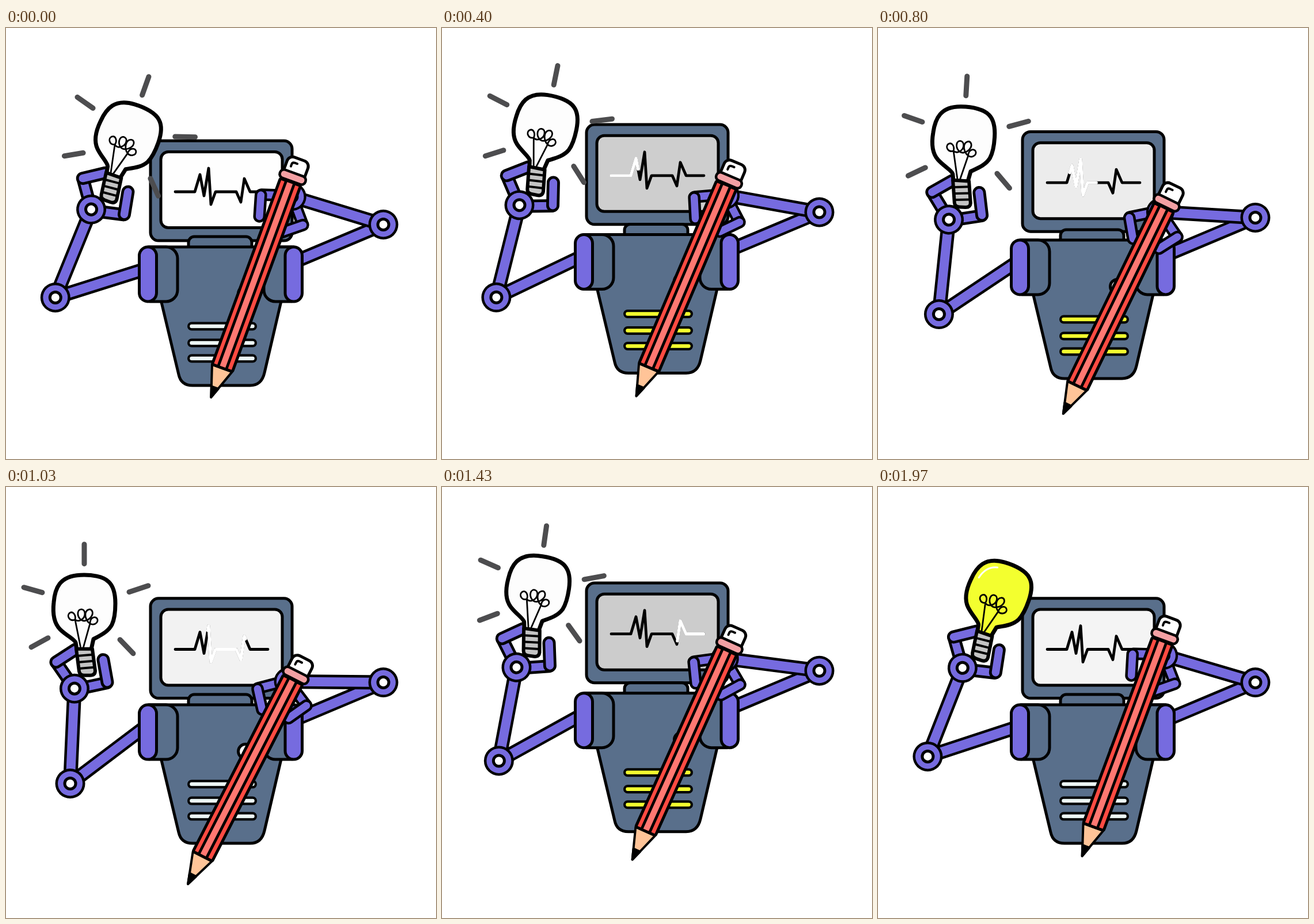
Recreate the animation shown at these times as an HTML page with a canvas. Size 747 by 750 pixels, loop 2.01 s.

```html
<!DOCTYPE html>
<html lang="en">
<head>
<meta charset="utf-8">
<title>Robot with pencil and light bulb</title>
<style>
html, body { margin: 0; width: 100%; height: 100%; overflow: hidden; background: #fff; }
canvas { display: block; }
</style>
</head>
<body>
<canvas id="stage" width="747" height="750"></canvas>
<script>
const ctx = document.getElementById('stage').getContext('2d');
const LOOP = 2010, STEPS = 60;
const BLUE = '#596f8b', PURPLE = '#766bdf', YELLOW = '#f3ff2f', INK = '#000';
const RAD = Math.PI / 180;
const clamp = v => Math.min(1, Math.max(0, v));
const smooth = u => u * u * (3 - 2 * u);

const glass = new Path2D('M4-68 L2-80 C0-86-14-92-25-103 C-36-114-38-132-36-150 ' +
  'C-34-174-26-196 10-197.5 C30-198.5 50-195 59-186 C69-177 71-160 71-148 ' +
  'C71-135 70-122 65-111 C58-98 44-92 33-86 L29-68 Z');
const filament = new Path2D('M11-70 L1-120 C-8-116-14-126-9-131 C-3-136 3-128 1-120 ' +
  'C8-114 18-122 18-130 C18-140 7-140 6-132 C5-124 12-116 19-118 ' +
  'C27-120 33-128 31-134 C28-141 20-137 19-130 C18-124 22-116 27-113 ' +
  'C33-109 41-114 40-120 C38-127 27-125 27-113 L15-70');
const socket = new Path2D('M3-69 L31-69 L36-31 Q36-23 27-23 L17-23 Q9-23 8-30 Z');
const shine = new Path2D('M-24-158 Q-18-181 1-185');
const torso = new Path2D('M247 381 H500 L449 600 Q444 622 424 622 H324 Q304 622 300 603 Z');
const pulse = new Path2D('M294 285 H328 L337 255 L344 292 L352 244 L356 307 L364 285 ' +
  'H400 L408 303 L414 262 L424 285 H455');
const PULSE_LEN = 391;
const rays = [[17, -251, 17, -217], [-88, -176, -56, -167], [-75, -72, -46, -88],
  [95, -168, 128, -179], [79, -85, 102, -61]];
const greys = [[0, 254], [1, 242], [7, 213], [17, 198], [20, 230], [29, 244], [30, 254]];

function lerpKeys(keys, x) {
  const i = keys.findIndex(k => k[0] > x);
  const [x0, y0] = keys[i - 1], [x1, y1] = keys[i];
  return y0 + (y1 - y0) * (x - x0) / (x1 - x0);
}

function paint(path, fill, width = 5, color = INK) {
  if (fill) { ctx.fillStyle = fill; ctx.fill(path); }
  if (width) { ctx.lineWidth = width; ctx.strokeStyle = color; ctx.stroke(path); }
}

function box(x0, y0, x1, y1, r, fill, width) {
  const p = new Path2D();
  p.roundRect(x0, y0, x1 - x0, y1 - y0, r);
  paint(p, fill, width);
}

function poly(points, fill, width) {
  const p = new Path2D();
  points.forEach(([x, y]) => p.lineTo(x, y));
  p.closePath();
  paint(p, fill, width);
}

function line(x0, y0, x1, y1, width, color) {
  ctx.lineWidth = width;
  ctx.strokeStyle = color;
  ctx.beginPath();
  ctx.moveTo(x0, y0);
  ctx.lineTo(x1, y1);
  ctx.stroke();
}

function rod(x0, y0, x1, y1, outer, inner, color = PURPLE) {
  line(x0, y0, x1, y1, outer, INK);
  line(x0, y0, x1, y1, inner, color);
}

function disc(x, y, r, color) {
  ctx.fillStyle = color;
  ctx.beginPath();
  ctx.arc(x, y, r, 0, 7);
  ctx.fill();
}

function joint(x, y) {
  disc(x, y, 26, INK);
  disc(x, y, 21.5, PURPLE);
  disc(x, y, 12, INK);
  disc(x, y, 7, '#fff');
}

function group(x, y, deg, draw, size = 1) {
  ctx.save();
  ctx.translate(x, y);
  ctx.rotate(deg * RAD);
  ctx.scale(size, size);
  draw();
  ctx.restore();
}

function hand() {
  rod(0, 0, -31, -45, 23, 13.5);
  rod(-32, -46, 2, -68, 23, 13.5);
  rod(0, 2, 56, -10, 23, 13.5);
  rod(50, -50, 57, -11, 23, 13.5);
  joint(0, 0);
}

function bulb(lit) {
  if (!lit) rays.forEach(r => line(...r, 9, '#4d4d4f'));
  paint(glass, lit ? YELLOW : '#fdfdfd', 7);
  paint(filament, null, 2.8);
  if (lit) paint(shine, null, 3, '#fff');
  paint(socket, '#c4c4c4', 6);
  for (let i = 0; i < 3; i++) line(7 + i * 1.5, -57 + i * 11, 31 + i * 1.5, -59 + i * 11, 4, INK);
}

function pencil() {
  poly([[0, -1], [-18, -55], [19, -55]], '#ffc498', 4);
  poly([[0, -1], [-6, -19], [6.5, -19]], INK, 4);
  box(-18, -400, 19.5, -55.5, 2, '#ff4b42', 5);
  ctx.fillStyle = '#ff7872';
  ctx.fillRect(-7, -398, 15, 340);
  line(-7, -398, -7, -57, 4.8, INK);
  line(8, -398, 8, -57, 4.8, INK);
  box(-17.5, -443, 21, -412, [10, 10, 2, 2], '#fff', 5);
  box(-22, -417, 25, -402, 7, '#f3a0a3', 4.5);
  paint(new Path2D('M-8-426 V-430 Q-8-434-3-434 H1'), null, 4);
}

function head(frame, lift) {
  const g = Math.round(lerpKeys(greys, frame % 30));
  group(0, -lift, 0, () => {
    box(251, 196.3, 497, 370, 14, BLUE);
    box(269, 215.5, 480, 347.5, 13, `rgb(${g},${g},${g})`);
    paint(pulse, null, 4.8);
    const end = PULSE_LEN * smooth(clamp(frame / 40));
    const start = PULSE_LEN * clamp((frame - 20) / 30);
    if (end - start > 1) {
      ctx.setLineDash([end - start, 1000]);
      ctx.lineDashOffset = -start;
      paint(pulse, null, 5.2, '#fff');
      ctx.setLineDash([]);
    }
  });
}

function body(frame) {
  const p = frame % 30;
  const glow = p >= 5 && p <= 24 ? YELLOW : '#edf8f6';
  box(317, 363, 427, 384, [10, 10, 0, 0], BLUE);
  paint(torso, BLUE);
  for (const y of [519, 548, 575]) rod(322.5, y, 428.5, y, 15, 6.5, glow);
  disc(416, 462, 15, INK);
  disc(416, 462, 10, '#fff');
  box(246, 381, 298, 476, [4, 20, 20, 4], BLUE);
  box(448, 381, 500, 476, [20, 4, 4, 20], BLUE);
}

function render(frame) {
  const half = frame % 30;
  const u = 1 - Math.abs(half - 15) / 15;
  const bounce = 0.6 * (1 - (1 - u) ** 2) + 0.4 * smooth(u);
  const swing = 1 - Math.abs(frame - 30) / 30;
  const bulge = 4 * swing * (1 - swing);

  ctx.fillStyle = '#fff';
  ctx.fillRect(0, 0, 747, 750);
  ctx.lineCap = ctx.lineJoin = 'round';
  head(frame, 30.2 * bounce);

  group(0, -23 * bounce, 0, () => {
    body(frame);

    // Left arm: the shoulder and elbow turn in opposite directions.
    const a = (18 + 20.2 * swing) * RAD, b = (22.1 - 20.2 * swing) * RAD;
    const ex = 240.8 - 163 * Math.cos(a), ey = 418.6 + 163 * Math.sin(a);
    const wx = ex + 165.5 * Math.sin(b), wy = ey - 165.5 * Math.cos(b);
    rod(240.8, 420, ex, ey, 25, 16);
    rod(ex, ey, wx, wy, 25, 16);
    joint(ex, ey);
    box(231.5, 381, 261.5, 476, 15, PURPLE);
    group(wx, wy, 20.2 * (1 - swing) - 0.67, () => {
      hand();
      bulb(frame >= 54);
    });

    // Right arm: only the forearm turns.
    const c = (17 - 17 * swing) * RAD;
    const hx = 655.5 - 165.5 * Math.cos(c), hy = 342 - 165.5 * Math.sin(c);
    rod(500, 407.5, 655.5, 342, 25, 16);
    box(485, 381, 514.5, 476, 15, PURPLE);
    rod(hx, hy, 655.5, 342, 25, 16);
    joint(655.5, 342);
    group(hx, hy, 194 - 17 * swing, hand, 0.94);
    group(356 - 41.4 * swing - 2.3 * bulge, 643.5 + 52 * swing - 1.5 * bulge,
      20.1 + 7.2 * swing, pencil);
  });
}

function tick() {
  const t = performance.now() % LOOP;
  render(Math.min(STEPS - 1, Math.floor((t + 5) * 0.03)));
  requestAnimationFrame(tick);
}
tick();
</script>
</body>
</html>
```
